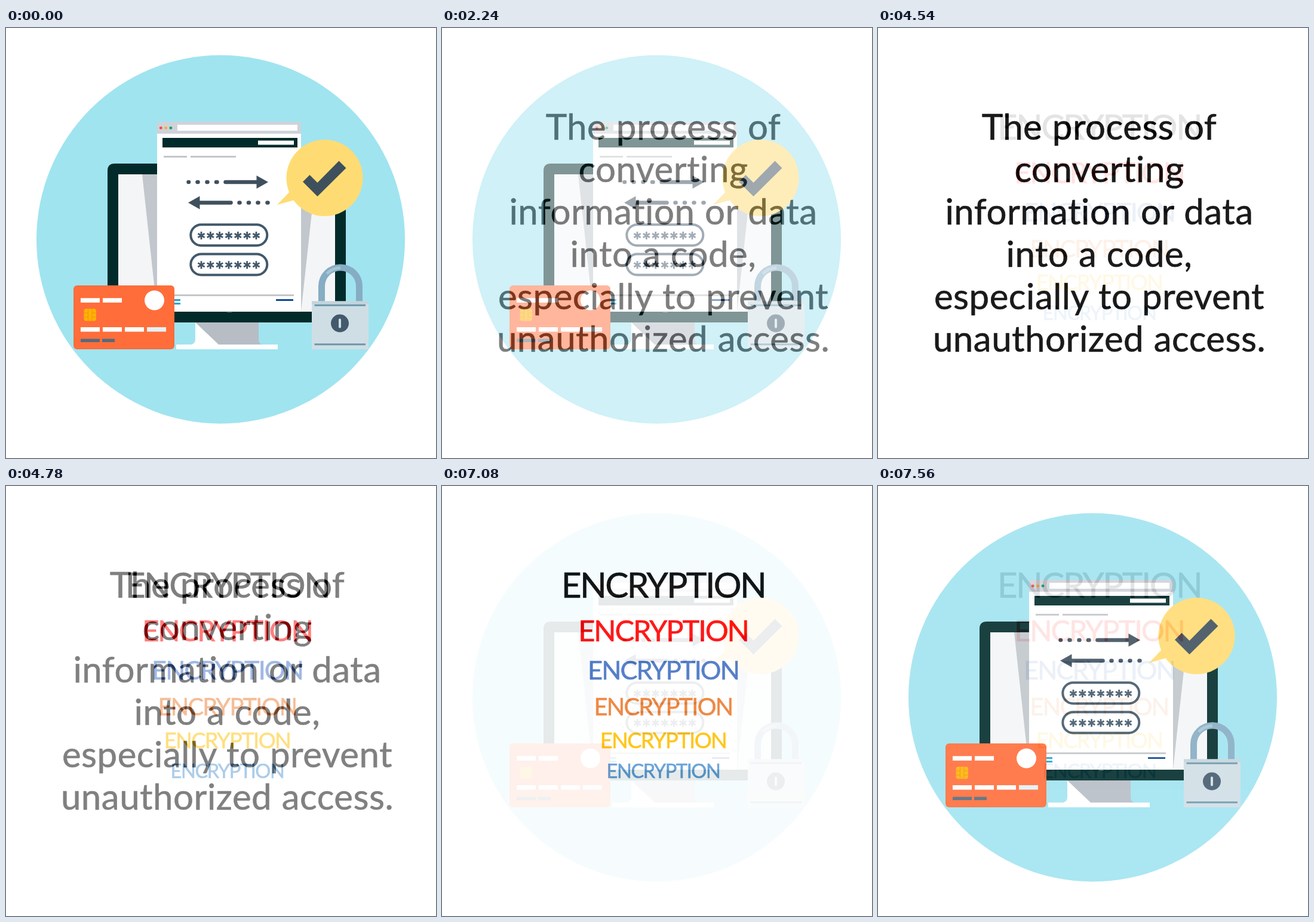
An HTML page that plays this animation: 720x720 px, repeating every 7620 ms.

```html
<!DOCTYPE html>
<html lang="en">
<head>
<meta charset="utf-8">
<title>Encryption</title>
<style>
  html, body { margin: 0; width: 100%; height: 100%; overflow: hidden; background: #fff; }
  svg { display: block; width: 100vw; height: 100vh; }
  text { font-family: Lato, "Open Sans", sans-serif; text-anchor: middle; stroke-width: .6; }
  #definition text { font-size: 60px; letter-spacing: .5px; word-spacing: .7px; fill: #000; stroke: #000; }
  #words text { letter-spacing: -.044em; }
</style>
</head>
<body>
<svg id="stage" viewBox="0 0 720 720">
  <g id="scene">
    <rect width="720" height="720" fill="#fff"/>
    <circle cx="359.5" cy="354" r="308.5" fill="#a0e4f0"/>

    <g id="monitor">
      <path d="M310 530Q317 528 317 521V493H423V521Q423 529 429 530Z" fill="#b6bdc5"/>
      <path d="M310 530Q317 528 317 521V493L356 530Z" fill="#fff"/>
      <rect x="285" y="530" width="170" height="8" fill="#fff"/>
      <path d="M170 493V239Q170 227 182 227H557Q569 227 569 239V493Z" fill="#002b2a"/>
      <rect x="188" y="245" width="363" height="230" fill="#f4f5f7"/>
      <path d="M228 245H519L494 475H253Z" fill="#c1c7cc"/>
    </g>

    <g id="browser">
      <rect x="253" y="157" width="241" height="318" fill="#fff"/>
      <rect x="253" y="157" width="241" height="20" fill="#cfd2d9"/>
      <circle cx="259.3" cy="167.3" r="2.4" fill="#ef4a4e"/>
      <circle cx="267.6" cy="167.3" r="2.4" fill="#fbb01f"/>
      <circle cx="275.9" cy="167.3" r="2.4" fill="#0aa266"/>
      <rect x="287" y="162" width="201" height="10" fill="#fff"/>
      <rect x="262" y="184" width="226" height="16" fill="#002b2a"/>
      <rect x="422" y="188.5" width="60" height="7" fill="#fff"/>
      <path d="M264 215.5H303M309 215.5H385M270 447.5H482" stroke="#c4c6ca" stroke-width="3"/>
      <path d="M275 455.5H292M275 461.5H292" stroke="#1ba5d8" stroke-width="3"/>
      <path d="M452 455.5H481" stroke="#0b4a97" stroke-width="3"/>
      <path d="M370 475H378" stroke="#aeb4ba" stroke-width="1.5"/>
    </g>

    <g fill="none" stroke="#3f505d" stroke-width="6.5" stroke-linecap="round">
      <path d="M305.5 258h.5M320.5 258h1M336.5 258h1M352 258h1.5M367.5 258H421"/>
      <path d="M322 292.5H376.5M390.5 292.5h1M406 292.5h1M421.5 292.5h1M437.5 292.5h1"/>
      <path d="M419.5 247L439 258L419.5 269ZM324.5 281.5L305 292.5L324.5 303.5Z" fill="#3f505d" stroke="none"/>
    </g>

    <g id="passwords" stroke="#42586a" stroke-width="4" fill="none">
      <rect x="309.3" y="329.3" width="128" height="35" rx="17.5"/>
      <rect x="309.3" y="378.5" width="128" height="35" rx="17.5"/>
    </g>

    <g id="bubble">
      <circle cx="533.5" cy="251" r="64" fill="#ffdc73"/>
      <path d="M477 272L454 296L487 287Z" fill="#ffdc73"/>
      <path d="M497 257.5L508.5 246L521.5 259L557.5 222.5L569.5 234.5L521.5 282Z" fill="#3f505d"/>
    </g>

    <g id="card">
      <rect x="113" y="431" width="169" height="107" rx="6" fill="#ff6d3b"/>
      <circle cx="248.5" cy="456" r="16.5" fill="#fff"/>
      <path d="M125 456H157M162 456H194M125 504.7H157M162 504.7H194M199 504.7H231" stroke="#fff" stroke-width="7.5"/>
      <path d="M236 504.7H268" stroke="#e3f1f6" stroke-width="7.5"/>
      <path d="M125 523.3H157M161 523.3H182" stroke="#566a7a" stroke-width="5.5"/>
      <rect x="130.5" y="470" width="20.5" height="20.5" rx="4" fill="#ffb400"/>
      <path d="M130.5 477H137M130.5 484H137M144.5 477H151M144.5 484H151M137.5 470V490.5M144 470V490.5" stroke="#f58a1f" stroke-width="1" fill="none"/>
    </g>

    <g id="lock" fill="none">
      <path d="M528.5 458V432.5a31.5 31.5 0 0 1 63 0V458" stroke="#86adc3" stroke-width="11"/>
      <path d="M537 411.5Q546 402 560 401.5" stroke="#a6c4d4" stroke-width="5"/>
      <rect x="512" y="457.5" width="95" height="80.5" fill="#cfdee5"/>
      <rect x="512" y="457.5" width="95" height="5" fill="#c3d4dd"/>
      <path d="M516.5 464.3H602M516.5 529.8H602" stroke="#6c97a9" stroke-width="3"/>
      <circle cx="559" cy="494.5" r="15" fill="#435a6c"/>
      <path d="M559 488.5V500.5" stroke="#cfdee5" stroke-width="4" stroke-linecap="round"/>
    </g>
  </g>

  <g id="definition"><rect width="720" height="720" fill="#fff"/></g>
  <g id="words"><rect width="720" height="720" fill="#fff"/></g>
</svg>
<script>
  const LOOP = 7620, STEP = 60;
  const byId = id => document.getElementById(id);
  const definition = byId("definition"), words = byId("words");

  function add(parent, tag, attrs, content = "") {
    const node = document.createElementNS("http://www.w3.org/2000/svg", tag);
    for (const key in attrs) node.setAttribute(key, attrs[key]);
    node.textContent = content;
    parent.append(node);
  }

  for (const y of [347.5, 396.7]) {
    for (let i = 0; i < 7; i++) {
      add(byId("passwords"), "path", {
        d: "M0-6.5V6.5M-5.6-3.3L5.6 3.3M-5.6 3.3L5.6-3.3",
        transform: `translate(${327 + i * 15.33} ${y})`,
        "stroke-width": 2.8
      });
    }
  }

  ["The process of", "converting", "information or data", "into a code,",
   "especially to prevent", "unauthorized access."].forEach((line, i) =>
    add(definition, "text", { x: 370.5, y: 187 + i * 71 }, line));

  [[58.6, 187, "#000"], [48.8, 260, "#f00"], [43.4, 323.5, "#4472c4"],
   [39.8, 384, "#ed7d31"], [36.3, 438.5, "#ffc000"], [32.6, 489, "#5b9bd5"]
  ].forEach(([size, y, color]) =>
    add(words, "text", { x: 370.5, y, "font-size": size, fill: color, stroke: color }, "ENCRYPTION"));

  // Stepped dissolve: ten equal jumps, the first one right at the start.
  const fade = (t, start) =>
    Math.min(1, Math.max(0, (Math.floor((t - start) / STEP) + 1) / 10));

  function draw(t) {
    const leaving = t >= 7080;
    definition.setAttribute("opacity", leaving ? 0 : fade(t, 2000));
    words.setAttribute("opacity", leaving ? 1 - fade(t, 7080) : fade(t, 4540));
  }

  const begin = performance.now();
  function tick() {
    draw((performance.now() - begin) % LOOP);
    requestAnimationFrame(tick);
  }
  draw(0);
  requestAnimationFrame(tick);
</script>
</body>
</html>
```
